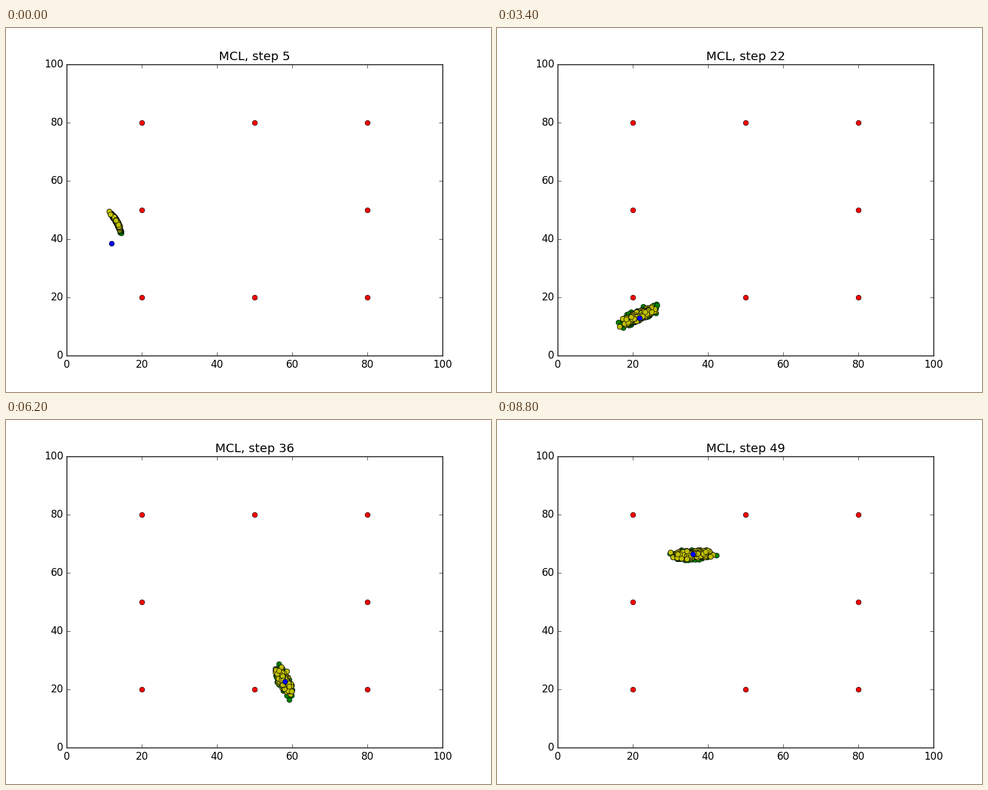
Animation, 800 px wide and 600 px high, one loop 9000 ms. Source, as a matplotlib script:

```python
from itertools import product

import numpy as np
import matplotlib.pyplot as plt
from matplotlib.animation import FuncAnimation

plt.style.use("classic")
plt.rcParams.update({
    "figure.dpi": 100,
    "figure.facecolor": "white",
    "font.family": "DejaVu Sans",
})

WORLD = 100
FIRST, LAST = 5, 49
COUNT = 500
SPEED, TURN = 5.0, 0.1
START = np.array([11.95, 38.5])
TILT = -0.13

steps = np.arange(FIRST, LAST + 1)
rng = np.random.default_rng(12)


def direction(angle):
    return np.array([np.cos(angle), np.sin(angle)])


def cell(points):
    return np.floor(points / WORLD)


def spread(z):
    """Scale each column to the range -1 to 1."""
    low, high = z.min(axis=0), z.max(axis=0)
    z = 2 * (z - low) / (high - low) - 1
    return np.sign(z) * np.abs(z) ** 0.85


def place(u, w, age, heading):
    """Lay the particles in a bowed band across the heading, relative to the robot."""
    def fade(span):
        return np.exp(-age / span)

    ahead = direction(heading)
    left = direction(heading + np.pi / 2)
    lead = 4.4 * fade(10)
    swing = 5.8 * fade(7) * np.cos(np.pi * age / 5)

    length = 6.2 - 2.2 * fade(2)
    width = 1.9 - 1.6 * fade(5)
    bow = 0.6 * fade(15)
    along = direction(heading + TILT - np.pi / 2)
    normal = direction(heading + TILT)
    across = width * w + bow * (1 - u ** 2)
    return (lead * ahead + swing * left
            + np.outer(length * u, along) + np.outer(across, normal))


def simulate():
    """Return moved particles, resampled particles and robot for each step."""
    robot, last = START, START
    z = rng.normal(size=(COUNT, 2))
    result = []
    for step in steps:
        heading = 0.039 + TURN * step
        if step > FIRST:
            last, robot = robot, robot + SPEED * direction(heading)
        u, w = spread(z).T
        cloud = robot + place(u, w, step - FIRST, heading)

        # Particles on the wrong side of the wrapping edge do not survive
        before = cloud - (robot - last)
        alive = (cell(before) == cell(last)).all(axis=1)
        fit = alive & (cell(cloud) == cell(robot)).all(axis=1)

        weight = np.exp(-2 * (u ** 2 + w ** 2)) * fit
        pick = rng.choice(COUNT, COUNT, p=weight / weight.sum())
        result.append((cloud[alive] % WORLD, cloud[pick] % WORLD, robot % WORLD))

        z = z[pick]
        z = (z - z.mean(axis=0)) / z.std(axis=0)
        z = 0.9 * z + 0.43 * rng.normal(size=z.shape)
    return result


states = simulate()

fig, ax = plt.subplots(figsize=(8, 6))
ax.set_xlim(0, WORLD)
ax.set_ylim(0, WORLD)
title = ax.set_title("")


def dots(color, x=(), y=()):
    return ax.plot(x, y, "o", color=color, markersize=6,
                   markeredgecolor="k", markeredgewidth=0.5)[0]


moved = dots("g")
resampled = dots("y")
landmarks = [p for p in product((20, 50, 80), repeat=2) if p != (50, 50)]
dots("r", *zip(*landmarks))
robot_dot = dots("b")


def draw(i):
    green, yellow, robot = states[i]
    moved.set_data(*green.T)
    resampled.set_data(*yellow.T)
    robot_dot.set_data([robot[0]], [robot[1]])
    title.set_text(f"MCL, step {steps[i]}")
    return moved, resampled, robot_dot, title


anim = FuncAnimation(fig, draw, frames=len(steps), interval=200,
                     repeat=True, repeat_delay=0, blit=False)
plt.show()
```
